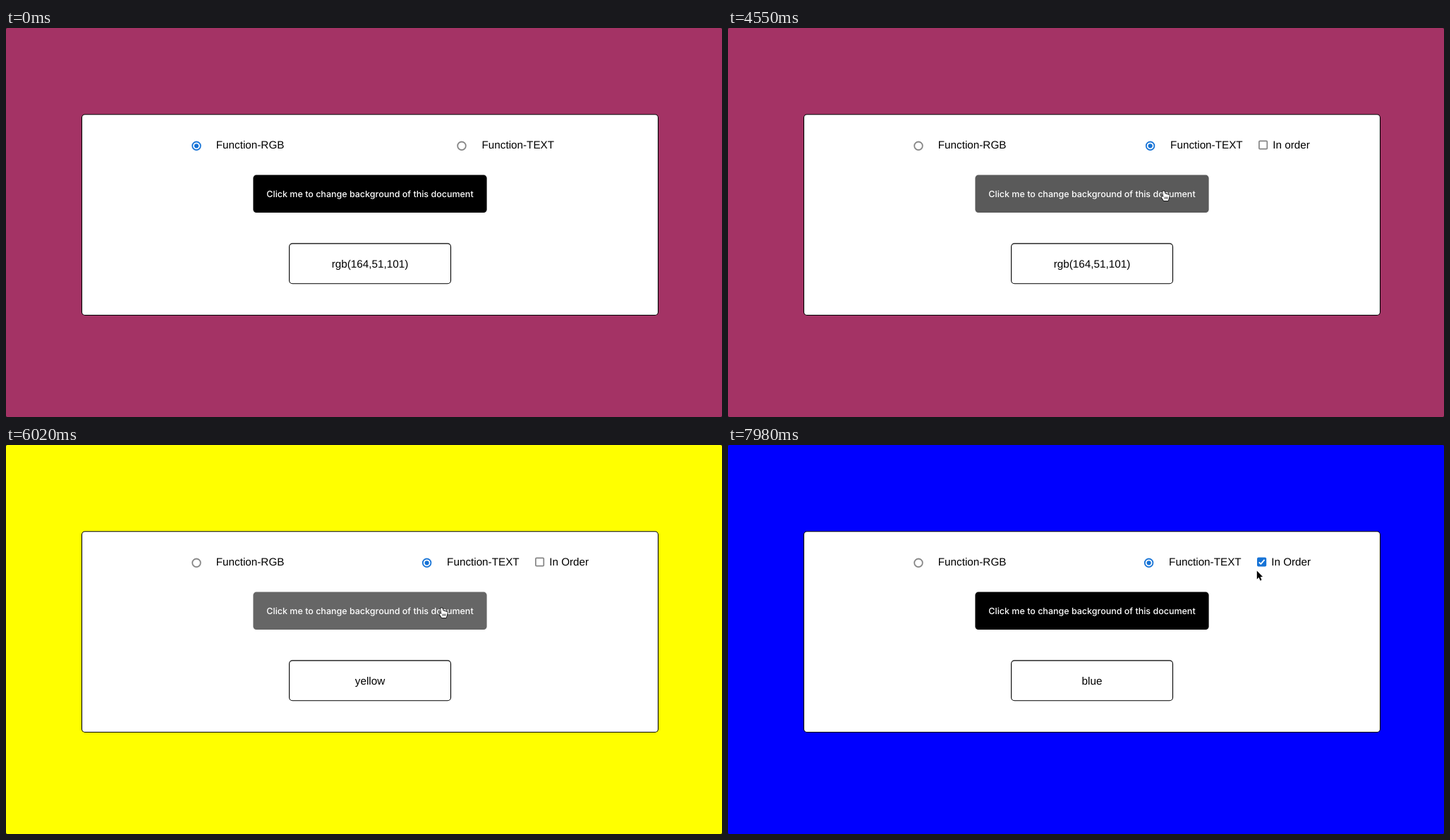
These frames come from a looping animation (1015 by 552 pixels, 8000 ms). An HTML page with a canvas:

```html
<!DOCTYPE html>
<html lang="en">
<head>
<meta charset="utf-8">
<title>Background changer</title>
<style>
html, body { margin: 0; width: 100%; height: 100%; overflow: hidden; background: #222; }
canvas { display: block; width: 1015px; height: 552px; }
</style>
</head>
<body>
<canvas id="stage"></canvas>
<script>
const W = 1015, H = 552, MID = 516, LOOP = 8000, STEP = 70;
const BLUE = '#1673d6', GRAY = '#858585', DARK = '#5a5a5a';
const LABEL = '15.25px "Liberation Sans", Arial, sans-serif';
const BUTTON = '500 12.5px Inter, sans-serif';

// Moments of the story, in ms
const ENTER = 350, FOCUS = 2800, NAMED = 3710, CHECK = 7910;
const HOVER_IN = 4315, HOVER_OUT = 6560, FADE = 300;
const colors = [
  { at: 0, name: 'rgb(164,51,101)' },
  { at: 5180, name: 'gray' },
  { at: 5530, name: 'yellowgreen' },
  { at: 5810, name: 'olive' },
  { at: 5950, name: 'yellow' },
  { at: 6300, name: 'blue' }
];
const ORDERED = colors[1].at;
const optionClicks = [2240, 3500, 7420];

// Each leg starts where the last one ended; `via` bends it
const origin = { x: 506, y: 532 };
const legs = [
  { from: ENTER, to: 1120, x: 356, y: 147 },
  { from: 1400, to: 2170, x: 647, y: 169.5, via: { x: 225, y: 218 } },
  { from: 2940, to: 3360, x: 645, y: 167 },
  { from: 3990, to: 4550, x: 617.5, y: 231 },
  { from: 6440, to: 7000, x: 748, y: 169 },
  { from: 7140, to: 7280, x: 755.5, y: 166.5 },
  { from: 7840, to: 7980, x: 749.5, y: 178 }
];

const canvas = document.getElementById('stage');
const ratio = window.devicePixelRatio || 1;
canvas.width = W * ratio;
canvas.height = H * ratio;
const ctx = canvas.getContext('2d');
ctx.scale(ratio, ratio);
ctx.textRendering = 'geometricPrecision';

const clamp = v => Math.max(0, Math.min(1, v));
const smooth = v => v * v * (3 - 2 * v);
const easeOut = v => 1 - (1 - v) ** 1.4;
const fade = (t, start) => smooth(clamp((t - start) / FADE));
const bend = (a, b, c, k) => a * (1 - k) ** 2 + 2 * b * k * (1 - k) + c * k * k;

function pointerAt(t) {
  let pos = origin;
  for (const leg of legs) {
    if (t < leg.from) break;
    const k = easeOut(clamp((t - leg.from) / (leg.to - leg.from)));
    const via = leg.via || { x: (pos.x + leg.x) / 2, y: (pos.y + leg.y) / 2 };
    pos = { x: bend(pos.x, via.x, leg.x, k), y: bend(pos.y, via.y, leg.y, k) };
  }
  return pos;
}

function ringRadius(t) {
  if (colors.some(c => t >= c.at - 2 * STEP && t < c.at)) return 29.5;
  if (optionClicks.some(c => t >= c && t < c + 3 * STEP)) return 20.5;
  return 0;
}

function box(x, y, w, h, r, fill, stroke, line = 1.1) {
  ctx.beginPath();
  ctx.roundRect(x, y, w, h, r);
  ctx.fillStyle = fill;
  ctx.fill();
  if (!stroke) return;
  ctx.strokeStyle = stroke;
  ctx.lineWidth = line;
  ctx.stroke();
}

function text(str, x, y, font = LABEL, align = 'left', fill = '#000') {
  ctx.font = font;
  ctx.textAlign = align;
  ctx.fillStyle = fill;
  ctx.fillText(str, x, y);
}

function circle(x, y, r) {
  ctx.beginPath();
  ctx.arc(x, y, r, 0, Math.PI * 2);
}

function ring(x, y, r, color, line) {
  circle(x, y, r);
  ctx.strokeStyle = color;
  ctx.lineWidth = line;
  ctx.stroke();
}

function radio(x, y, on, color = GRAY) {
  ring(x, y, 5.8, on ? BLUE : color, 1.8);
  if (!on) return;
  circle(x, y, 3.1);
  ctx.fillStyle = BLUE;
  ctx.fill();
}

function checkbox(x, y, on, color) {
  if (!on) return box(x - 5.7, y - 5.7, 11.4, 11.4, 1.2, '#fff', color, 1.7);
  box(x - 6.6, y - 6.6, 13.2, 13.2, 2, BLUE);
  shape(x, y, 'M-3.8 .3L-1.3 2.9L3.9 -3.2', 'transparent', '#fff', 1.8);
}

function shape(x, y, d, fill, edge, line) {
  const p = new Path2D(d);
  ctx.save();
  ctx.translate(x, y);
  ctx.lineJoin = 'round';
  ctx.strokeStyle = edge;
  ctx.lineWidth = line;
  ctx.stroke(p);
  ctx.fillStyle = fill;
  ctx.fill(p);
  ctx.restore();
}

function arrow(x, y) {
  shape(x, y, 'M.3 .5V12.4L3 9.8L5 14.4L7 13.5L5.1 9H8.5Z', '#000', '#fff', 1.5);
}

function hand(x, y) {
  shape(x, y, 'M-1.5 1Q0 -.6 1.3 1L2.3 4.5Q3.6 3.7 4.4 5Q5.6 4.2 6.4 5.6Q8 5 8.3 7' +
    'L7.4 11L6.4 14H.2L-2.8 9.6Q-3.6 7.7-1.8 8L-.2 9Z', '#fff', '#000', 1.5);
  shape(x, y, 'M1.7 8.6v3M3.6 8.6v3M5.4 8.6v3', 'transparent', '#000', 0.8);
}

function options(t) {
  const named = t >= NAMED, ordered = t >= ORDERED;
  radio(270, 167.3, !named);
  text('Function-RGB', 297.8, 171.4);
  const x = !named ? 646 : ordered ? 596.6 : 598.6;
  radio(x, 167.3, named, t >= FOCUS ? DARK : GRAY);
  text('Function-TEXT', x + 28.5, 171.4);
  if (!named) return;
  checkbox(x + 160, 166, t >= CHECK, t >= 7140 ? DARK : GRAY);
  text(ordered ? 'In Order' : 'In order', x + 173.6, 171);
}

function pointer(t) {
  const { x, y } = pointerAt(t);
  const r = ringRadius(t);
  if (r) ring(x, y, r, 'rgba(60,60,60,.5)', 2);
  if (t >= HOVER_IN && t < HOVER_OUT) hand(x, y);
  else arrow(x, y);
}

function draw(t) {
  const color = colors.findLast(c => c.at <= t).name;
  ctx.fillStyle = '#222';
  ctx.fillRect(0, 0, W, H);
  box(0, 0, W, H, 2, color);
  box(107.5, 122.8, 817, 284.7, 4.5, '#fff', '#000');
  options(t);

  const shade = Math.round(102 * (fade(t, HOVER_IN) - fade(t, HOVER_OUT)));
  box(350.4, 208.6, 331.2, 53.4, 4.5, `rgb(${shade},${shade},${shade})`);
  text('Click me to change background of this document', MID, 240.2, BUTTON, 'center', '#fff');

  box(401.6, 305.9, 228.9, 56.9, 4.5, '#fff', '#000');
  text(color, MID, 339.8, LABEL, 'center');

  if (t >= ENTER) pointer(t);
}

const start = performance.now();
function frame() {
  const t = (performance.now() - start) % LOOP;
  draw(Math.floor(t / STEP) * STEP);
  requestAnimationFrame(frame);
}
frame();
</script>
</body>
</html>
```
